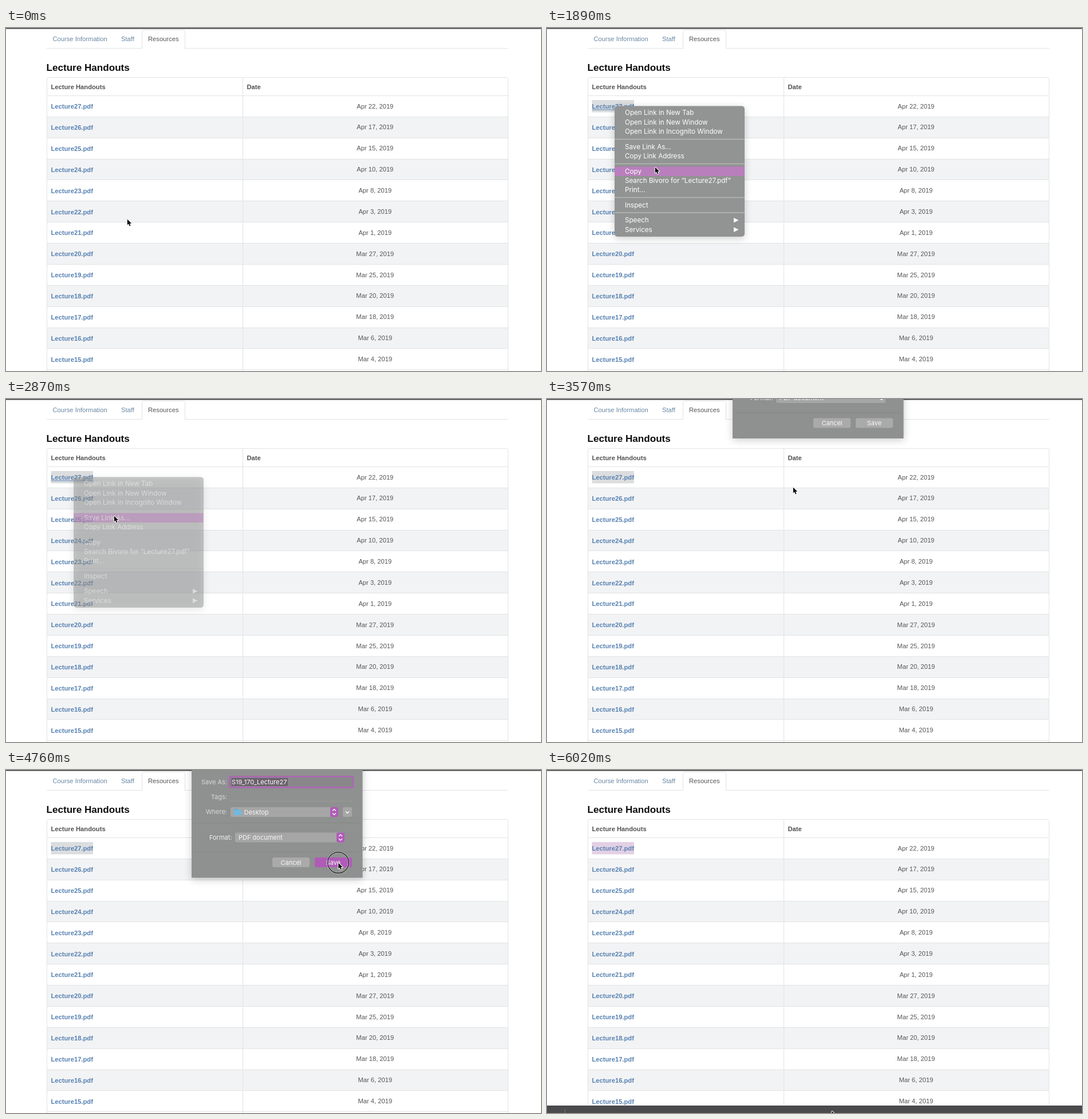
These frames come from a looping animation (934 px wide and 600 px high, 6.09 s). An HTML page with a canvas:

```html
<!DOCTYPE html>
<html lang="en">
<head>
<meta charset="utf-8">
<title>Saving a lecture handout</title>
<style>
html, body { margin: 0; width: 100%; height: 100%; overflow: hidden; background: #fff; }
canvas { display: block; width: 934px; height: 600px; }
</style>
</head>
<body>
<canvas id="stage" width="934" height="600"></canvas>
<script>
const ctx = document.getElementById('stage').getContext('2d');
const LOOP = 6090, STEP = 70;
const PAGE = '"Liberation Sans", Arial, sans-serif';
const UI = 'Inter, Roboto, sans-serif';
const ACCENT = '#b05bb8';

const DATES = ['Apr 22', 'Apr 17', 'Apr 15', 'Apr 10', 'Apr 8', 'Apr 3', 'Apr 1',
  'Mar 27', 'Mar 25', 'Mar 20', 'Mar 18', 'Mar 6', 'Mar 4'];
const MENU = [
  ['Open Link in New Tab', 148], ['Open Link in New Window', 164.5],
  ['Open Link in Incognito Window', 181], ['Save Link As...', 207.5],
  ['Copy Link Address', 224], ['Copy', 250.5],
  ['Search Bivoro for “Lecture27.pdf”', 267], ['Print...', 283],
  ['Inspect', 309.5], ['Speech', 336, true], ['Services', 352.5, true]
];
const MENU_RULES = [194.5, 237.5, 296.5, 323];

// Pointer stops: time, x, y
const PATH = [
  [70, 211.5, 334], [910, 117.5, 141], [1500, 117.5, 141], [1890, 188.5, 243],
  [2170, 188.5, 243], [2520, 188.5, 204], [3150, 188.5, 204], [3570, 429.5, 154],
  [3780, 429.5, 154], [4480, 580, 162], [5200, 580, 162]
];
const EXIT = [[5250, 580, 162], [5810, 525, 490], [6020, 497, 596]];

const clamp = v => Math.max(0, Math.min(1, v));
const ramp = (t, a, b) => clamp((t - a) / (b - a));
const smooth = p => p * p * (3 - 2 * p);
const within = (t, a, b) => t >= a && t < b;

function follow(stops, t, ease) {
  let [, x, y] = stops[0];
  for (let i = 1; i < stops.length; i++) {
    const [t0, x0, y0] = stops[i - 1], [t1, x1, y1] = stops[i];
    if (t < t0) break;
    const p = ease(ramp(t, t0, t1));
    x = x0 + (x1 - x0) * p;
    y = y0 + (y1 - y0) * p;
  }
  return { x, y };
}

function rect(x, y, w, h, color) {
  ctx.fillStyle = color;
  ctx.fillRect(x, y, w, h);
}

function round(x, y, w, h, r, color, stroke, width = 1) {
  ctx.beginPath();
  ctx.roundRect(x, y, w, h, r);
  if (color) { ctx.fillStyle = color; ctx.fill(); }
  if (stroke) { ctx.strokeStyle = stroke; ctx.lineWidth = width; ctx.stroke(); }
}

function text(str, x, y, font, color, align = 'left') {
  ctx.font = font;
  ctx.fillStyle = color;
  ctx.textAlign = align;
  ctx.fillText(str, x, y);
}

function poly(points, color, stroke, width = 1) {
  ctx.beginPath();
  points.forEach(([x, y]) => ctx.lineTo(x, y));
  if (color) { ctx.closePath(); ctx.fillStyle = color; ctx.fill(); }
  if (stroke) { ctx.strokeStyle = stroke; ctx.lineWidth = width; ctx.stroke(); }
}

function raised(draw) {
  ctx.save();
  ctx.shadowColor = 'rgba(0,0,0,.2)';
  ctx.shadowBlur = 13;
  ctx.shadowOffsetY = 3;
  draw();
  ctx.restore();
}

function drawPage(selection, underline) {
  const small = '11.2px ' + PAGE, bold = 'bold 11.2px ' + PAGE;
  const line = '#e2e3e4';
  rect(0, 0, 934, 600, '#fff');
  rect(0, 0, 934, 1.6, '#464648');

  rect(71, 35, 806, 1, line);
  round(237.5, 3.5, 75, 36, 3, '#fff', line);
  rect(236, 36, 78, 5, '#fff');
  rect(238, 35, 74, 1, '#fff');
  text('Course Information', 81.5, 23, small, '#6886a3');
  text('Staff', 201, 23, small, '#6886a3');
  text('Resources', 248, 23, small, '#555');
  text('Lecture Handouts', 70.5, 74.5, 'bold 17.1px ' + PAGE, '#0c0c0c');

  const top = 118.5, pitch = 36.87;
  for (let i = 1; i < 13; i += 2) rect(72, top + i * pitch, 804, pitch, '#f2f3f5');
  for (let i = 0; i < 14; i++) rect(72, Math.round(top + i * pitch - 0.5), 804, 1, line);
  round(71.5, 86.5, 805, 530, 3, null, line);
  rect(413, 87, 1, 513, line);
  text('Lecture Handouts', 78.5, 107, bold, '#505050');
  text('Date', 420.5, 107, bold, '#505050');

  if (selection) rect(78.5, 126, 73.5, 21.5, selection);
  DATES.forEach((date, i) => {
    const y = 141.2 + i * pitch;
    text(`Lecture${27 - i}.pdf`, 78.5, y, bold, '#5681b1');
    text(date + ', 2019', 644.3, y - 0.6, small, '#555', 'center');
  });
  if (underline) rect(78.5, 142.5, 73.5, 1, '#5681b1');
}

function drawMenu(pointer, alpha) {
  ctx.save();
  ctx.globalAlpha = alpha;
  raised(() => round(118, 136.5, 227, 228.5, 5, '#929393'));
  for (const y of MENU_RULES) rect(118, y - 0.8, 227, 1.6, '#b4b5b5');
  for (const [label, y, nested] of MENU) {
    if (pointer.x > 120 && Math.abs(pointer.y - y) < 8.2) rect(118, y - 8, 226.5, 16.5, '#b97fbd');
    text(label, 136, y + 4.3, '11.65px ' + UI, '#fff');
    if (nested) poly([[326, y - 4], [334.5, y + 0.3], [326, y + 4.6]], '#fff');
  }
  ctx.restore();
}

function chevron(x, y, dir, size = 3) {
  poly([[x - size, y - dir * size / 2], [x, y + dir * size / 2], [x + size, y - dir * size / 2]],
    null, '#fff', 1.3);
}

function popup(x, y, right, label, inset, active) {
  const font = '11px ' + UI;
  round(x, y - 8.5, right - x, 17, 3, '#a6a6a6');
  text(label, x + inset, y + 4, font, '#f6f6f6');
  if (active) {
    round(right - 14, y - 8.5, 14, 17, 3, ACCENT);
    chevron(right - 7, y - 3.5, -1);
    chevron(right - 7, y + 3.5, 1);
  } else {
    chevron(right - 7, y + 1.5, 1);
  }
}

function button(x, label, color) {
  round(x, 153, 65, 17, 3, color);
  text(label, x + 32.5, 165.5, '11px ' + UI, '#f8f8f8', 'center');
}

function drawDialog(shown, active) {
  const font = '11px ' + UI, label = '#d9d9d9';
  ctx.save();
  ctx.translate(0, (shown - 1) * 188);
  raised(() => rect(324, -20, 298.5, 208.5, '#8f9090'));

  text('Save As:', 386, 25, font, label, 'right');
  round(390, 11.5, 216, 19, 2, '#8a878b', active ? '#ad66b5' : '#a4a4a4', active ? 2.4 : 1);
  if (active) rect(393.5, 14, 98.5, 14, '#6c626e');
  text('S19_170_Lecture27', 394, 25, font, '#fff');

  text('Tags:', 386, 51, font, label, 'right');
  rect(391, 54, 214, 1, '#9b9b9b');

  text('Where:', 386, 77, font, label, 'right');
  popup(392, 73.5, 580, 'Desktop', 23.5, active);
  round(398, 68, 6, 4, 1, '#5ba4cf');
  round(398, 69.5, 13, 9.5, 1, '#70b9df');
  round(588, 65, 16, 17, 3, '#a6a6a6');
  chevron(596, 74, 1);

  rect(327, 92, 292, 1, '#868787');
  text('Format:', 394.5, 122, font, '#f2f2f2', 'right');
  popup(400, 118, 591, 'PDF document', 6, active);
  rect(327, 143, 292, 1, '#868787');
  button(465, 'Cancel', '#aaa');
  button(539, 'Save', active ? ACCENT : '#aaa');
  ctx.restore();
}

function drawShelf(shown) {
  const y = 600 - 13 * shown;
  rect(0, y, 934, 13, '#4b4b4e');
  rect(0, y, 934, 1, '#414144');
  rect(31, y + 6, 1, 8, '#77777a');
}

function drawRing({ x, y }, color) {
  for (const [stroke, width] of [['rgba(255,255,255,.5)', 3], [color, 1.4]]) {
    ctx.beginPath();
    ctx.arc(x, y, 18.3, 0, 2 * Math.PI);
    ctx.strokeStyle = stroke;
    ctx.lineWidth = width;
    ctx.stroke();
  }
}

function drawPointer({ x, y }) {
  ctx.save();
  ctx.translate(x, y);
  ctx.lineJoin = 'round';
  const arrow = [[0.3, 0.5], [0.3, 10.6], [2.6, 8.5], [4.3, 12.4], [6, 11.7], [4.4, 7.9], [7.6, 7.9], [0.3, 0.5]];
  poly(arrow, null, '#fff', 2);
  poly(arrow, '#050505');
  ctx.restore();
}

function draw(t) {
  const pointer = t < 5250 ? follow(PATH, t, smooth) : follow(EXIT, t, p => p);
  const overLink = pointer.x > 78 && pointer.x < 152 && pointer.y > 130 && pointer.y < 148;
  const menuOpen = within(t, 1190, 2940);
  const selection = t < 1050 ? null : t < 5320 ? '#dcdddf' : '#e3d0e5';
  drawPage(selection, overLink || menuOpen);

  if (menuOpen) drawMenu(pointer, 1 - ramp(t, 2800, 2940));

  const sheet = smooth(ramp(t, 3425, 3780)) - smooth(ramp(t, 4900, 5180));
  if (sheet > 0) drawDialog(sheet, within(t, 3850, 4900));

  const shelf = smooth(ramp(t, 5460, 5740));
  if (shelf > 0) drawShelf(shelf);

  if (within(t, 1050, 1190)) drawRing(pointer, '#52ad58');
  if (within(t, 2730, 2870) || within(t, 4690, 4900)) drawRing(pointer, '#1c1a1d');
  drawPointer(pointer);
}

const start = performance.now();
function tick() {
  const t = (performance.now() - start) % LOOP;
  draw(Math.floor(t / STEP) * STEP);
  requestAnimationFrame(tick);
}
tick();
</script>
</body>
</html>
```
